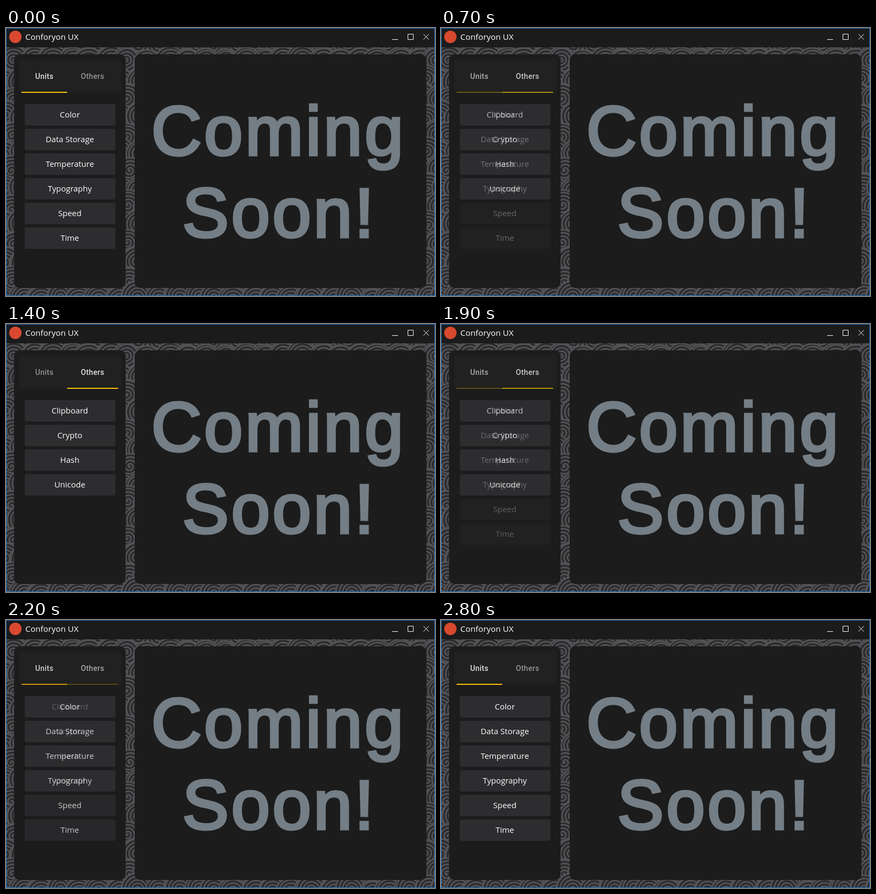
An HTML page that plays this animation: 800 by 500 pixels, repeating every 2820 ms.

```html
<!DOCTYPE html>
<html lang="en">
<head>
<meta charset="utf-8">
<title>Conforyon UX</title>
<style>
html, body { margin: 0; width: 100%; height: 100%; overflow: hidden; background: #1c1c1c; }
svg { display: block; width: 800px; height: 500px; }
.ui { font: 15px "Open Sans", sans-serif; fill: #fff; }
.tab { font: 500 14px Roboto, sans-serif; letter-spacing: .35px; }
.big { font: 130px "Liberation Sans", Arial, sans-serif; letter-spacing: 4.4px; fill: #747e86; stroke: #747e86; stroke-width: 5; }
.mid { text-anchor: middle; }
.line { fill: none; stroke: #fff; }
</style>
</head>
<body>
<svg viewBox="0 0 800 500">
  <rect width="800" height="500" fill="#2b2b2d"/>
  <g id="swirls" fill="#2b2b2d" stroke="#535356" stroke-width="2.8"></g>
  <rect width="800" height="36" fill="#1b1b1b"/>
  <circle cx="17.5" cy="16.5" r="11.5" fill="#d8492f"/>
  <text class="ui" x="36" y="22" style="font-size:15.3px">Conforyon UX</text>
  <path class="line" d="M720 21.5h11M749.5 11.5h10v10h-10z"/>
  <path class="line" d="M778.5 11.5l10 10m0-10l-10 10"/>
  <rect x="15" y="49" width="208" height="436" rx="10" fill="#1c1c1c"/>
  <g id="units"></g>
  <g id="others"></g>
  <rect x="240" y="49" width="544" height="436" rx="10" fill="#1c1c1c"/>
  <text class="big mid" x="508.2" y="236.5">Coming</text>
  <text class="big mid" x="509.7" y="389.5">Soon!</text>
  <rect x=".5" y=".5" width="799" height="499" fill="none" stroke="#1e7edc"/>
</svg>
<script>
const byId = id => document.getElementById(id);

// Overlapping discs, each carrying a spiral
let seed = 11;
const random = () => (seed = seed * 16807 % 2147483647) / 2147483647;

function swirl(x, y, radius, turn) {
  const pitch = 6.4;
  let path = `M${x} ${y}`;
  for (let a = 0; a < radius / pitch * 2 * Math.PI; a += 0.3) {
    const r = pitch * a / (2 * Math.PI);
    path += `L${(x + r * Math.cos(a + turn)).toFixed(1)} ${(y + r * Math.sin(a + turn)).toFixed(1)}`;
  }
  return `<circle cx="${x}" cy="${y}" r="${radius}"/><path fill="none" d="${path}"/>`;
}

let swirls = '';
for (let row = 0; row < 15; row++) {
  for (let col = 0; col < 24; col++) {
    const x = col * 36 + row % 2 * 18 - 10 + random() * 10;
    const y = row * 34 + 24 + random() * 10;
    const hidden = y > 82 && y < 452 && (x > 48 && x < 190 || x > 273 && x < 751);
    const radius = 23 + random() * 7, turn = random() * 6.28;
    if (!hidden) swirls += swirl(x, y, radius, turn);
  }
}
byId('swirls').innerHTML = swirls;

// Side panel with one of the two tabs selected
const tabs = [
  { name: 'Units', x: 29, width: 85, textX: 71.5 },
  { name: 'Others', x: 114, width: 95, textX: 161.5 }
];

function sidePanel(active, labels) {
  const bar = '<rect x="16" y="56" width="206" height="420" fill="#1c1c1c"/>' +
    '<rect x="25" y="58" width="190" height="63" fill="#202120"/>';
  const heads = tabs.map((tab, i) =>
    `<text class="tab mid" x="${tab.textX}" y="95" fill="${i === active ? '#e2e2e2' : '#949494'}">${tab.name}</text>`);
  const { x, width } = tabs[active];
  const underline = `<rect x="${x}" y="119" width="${width}" height="2" fill="#ffc107"/>`;
  const buttons = labels.map((label, i) =>
    `<rect x="35" y="${142 + 46 * i}" width="169" height="40" rx="3" fill="#2d2d30"/>` +
    `<text class="ui mid" x="119" y="${167 + 46 * i}">${label}</text>`);
  return bar + heads.join('') + underline + buttons.join('');
}

byId('units').innerHTML = sidePanel(0, ['Color', 'Data Storage', 'Temperature', 'Typography', 'Speed', 'Time']);
byId('others').innerHTML = sidePanel(1, ['Clipboard', 'Crypto', 'Hash', 'Unicode']);

// Ten 100 ms steps, each keeping 70 % of the previous view
function remaining(elapsed) {
  const step = Math.floor(elapsed / 100) + 1;
  return step < 1 ? 1 : step >= 10 ? 0 : 0.7 ** step;
}

function draw() {
  const t = performance.now() % 2820;
  byId('others').setAttribute('opacity', t < 1900 ? 1 - remaining(t - 500) : remaining(t - 1900));
  requestAnimationFrame(draw);
}
draw();
</script>
</body>
</html>
```
